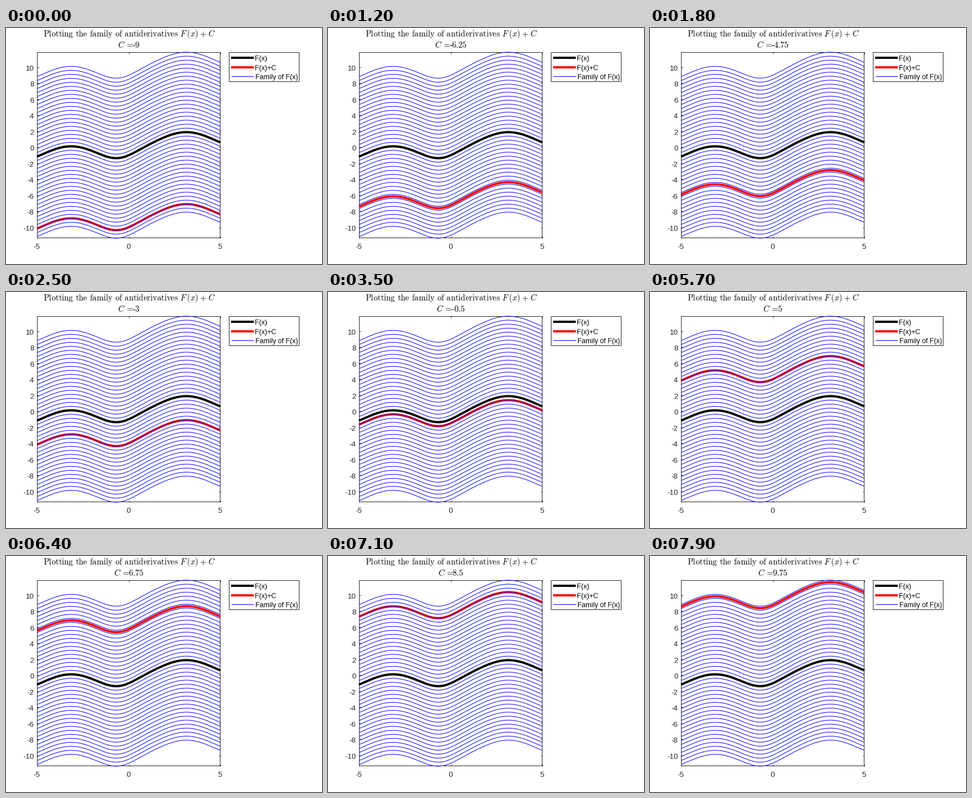
Write a matplotlib script that moves like this. It is 560 by 420 pixels and loops after 8000 ms.

```python
from math import erf, pi, sqrt

import matplotlib.pyplot as plt
import numpy as np
from matplotlib.animation import FuncAnimation
from matplotlib.patches import Rectangle

W, H, DPI = 560, 420, 100
PX = 72 / DPI                       # points per pixel
INK = "#262626"
LEFT, RIGHT, TOP, BOTTOM = 55, 380, 43, 374
MID = (LEFT + RIGHT) / 2
EM = 44 / 3                         # title size in pixels
BASE = 35                           # baseline of the second title line
FRAMES, INTERVAL = 80, 100
C_START, C_MAX, C_STEP = -9, 10, 0.25

plt.rcParams.update({"font.family": "Liberation Sans", "mathtext.fontset": "cm",
                     "axes.unicode_minus": False})


def F(x):
    """Antiderivative of exp(-x^2) + sin(x)."""
    return sqrt(pi) / 2 * np.vectorize(erf)(x) - np.cos(x)


def constant(i):
    """C holds for two frames at each end of its sweep."""
    c = C_START + C_STEP * max(i - 1, 0)
    return c if c <= C_MAX else 2 * C_MAX + C_STEP - c


fig = plt.figure(figsize=(W / DPI, H / DPI), dpi=DPI, facecolor="white")

# Pixel-space layer for titles, tick labels, frames and legend
page = fig.add_axes([0, 0, 1, 1])
page.set(xlim=(0, W), ylim=(H, 0))
page.axis("off")

ax = fig.add_axes([LEFT / W, 1 - BOTTOM / H, (RIGHT - LEFT) / W, (BOTTOM - TOP) / H])
x = np.linspace(-5, 5, 401)
y = F(x)
y_min, y_max = y.min() - 10, y.max() + 10
ax.set(xlim=(-5, 5), ylim=(y_min, y_max), xticks=[-5, 0, 5], yticks=range(-10, 11, 2))
ax.tick_params(direction="in", top=True, right=True, length=3.3 * PX, width=PX,
               color=INK, labelbottom=False, labelleft=False)
ax.spines[:].set_visible(False)
ax.patch.set_visible(False)


def label(px, py, text, size, color=INK, ha="left"):
    return page.text(px, py, text, fontsize=size * PX, color=color, ha=ha, va="baseline")


def box(left, top, right, bottom):
    """One-pixel outline covering the given pixel bounds."""
    page.add_patch(Rectangle((left + 0.1, top + 0.1), right - left - 1, bottom - top - 1,
                             fc="none", ec=INK, lw=PX, snap=True))


def curve(c, color, width, z):
    line, = ax.plot(x, y + c, color=color, lw=width * PX, zorder=z,
                    clip_on=False, solid_capstyle="butt")
    return line


box(LEFT, TOP, RIGHT, BOTTOM)
for v in range(-10, 11, 2):
    py = TOP + (y_max - v) / (y_max - y_min) * (BOTTOM - TOP)
    label(49.5, py + 6, str(v), 40 / 3, ha="right")
for v in (-5, 0, 5):
    label(MID - 0.5 + v * (RIGHT - LEFT) / 10, 393, str(v), 40 / 3, ha="center")

red = curve(C_START, "red", 4, 3)
for c in np.arange(-10, 10.5, 0.5):
    curve(c, "blue", 1, 4)
curve(0, "black", 4, 5)

box(395, 43, 520, 96)
for py, name, color, width in ((53, "F(x)", "black", 4), (70, "F(x)+C", "red", 4),
                               (86, "Family of F(x)", "blue", 1)):
    page.plot([399, 439], [py, py], color=color, lw=width * PX, solid_capstyle="butt")
    label(441.5, py + 5, name, 12.3, "black")

# Math spaces are measured in widths of "m" (0.878 em)
words = r"\hspace{0.38}".join("Plotting the family of antiderivatives".split())
formula = r"F\hspace{0.16}(x)\hspace{0.05}+\hspace{0.05}C"
label(218.5, 15.4, rf"$\mathrm{{{words}}}\hspace{{0.38}}{formula}$", EM, "black", "center")

# Second title line: "C =" then the value set tight against it
c_equals = label(0, BASE, r"$C\hspace{0.2}=$", EM, "black")
digits = label(0, BASE, "", EM, "black", "right")
hyphen = page.add_patch(Rectangle((0, BASE - 0.245 * EM), 0.265 * EM, 0.07 * EM, fc="black", lw=0))


def update(i):
    c = constant(i)
    red.set_ydata(y + c)
    text = f"{abs(c):g}"
    dash = 0.333 if c < 0 else 0
    width = 1.843 + dash + sum(0.278 if ch == "." else 0.5 for ch in text)
    start = MID - width * EM / 2
    c_equals.set_x(start)
    hyphen.set_x(start + 1.854 * EM)
    hyphen.set_visible(c < 0)
    digits.set_x(start + width * EM)
    digits.set_text(rf"$\mathrm{{{text}}}$")
    return red, c_equals, hyphen, digits


anim = FuncAnimation(fig, update, frames=FRAMES, interval=INTERVAL, repeat=True, repeat_delay=0)
plt.show()
```
